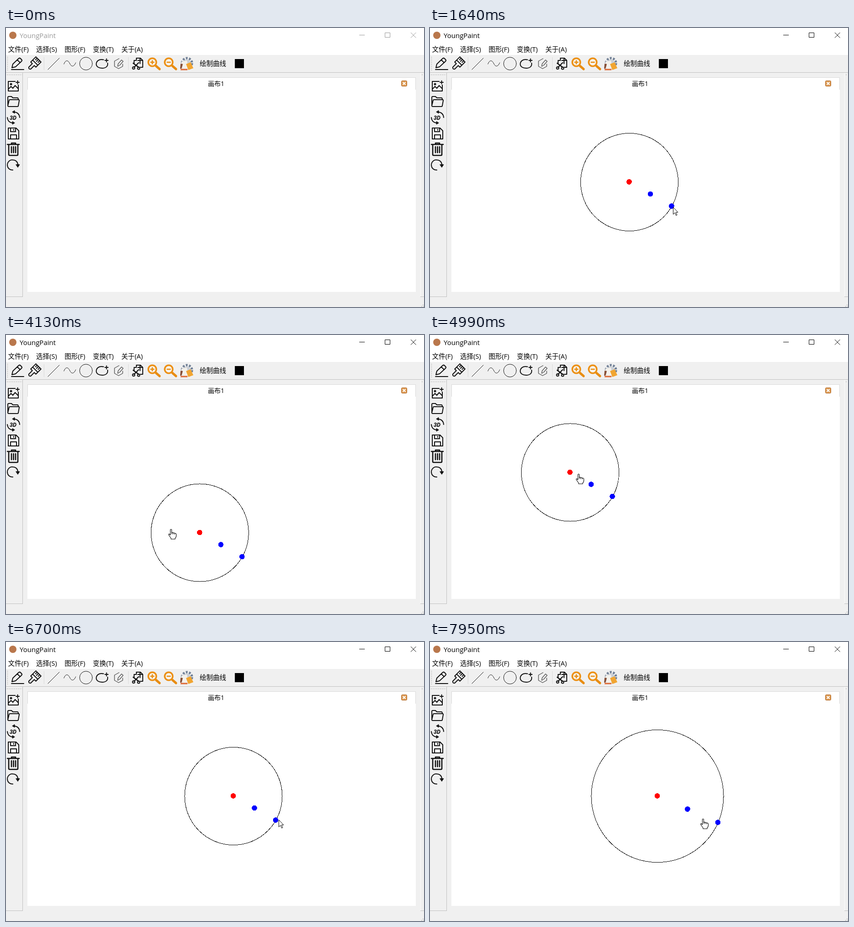
These frames come from a looping animation (917x611 px, 8000 ms). An HTML page:

```html
<!DOCTYPE html>
<html lang="zh">
<meta charset="utf-8">
<title>Paint</title>
<style>
html, body { margin: 0; width: 100%; height: 100%; overflow: hidden; background: #f0f0f0 }
svg { display: block }
text { font-family: "Open Sans", "Noto Sans CJK SC", "Noto Sans CJK", sans-serif }
.icon { fill: none; stroke: #111; stroke-width: 2; stroke-linejoin: round; stroke-linecap: round }
.thin { stroke-width: 1 }
.crisp { shape-rendering: crispEdges }
</style>
<svg width="917" height="611" viewBox="0 0 917 611">
  <path fill="#fff" d="M0 0H917V59H0ZM47 108H899V578H47Z"/>
  <g class="crisp" fill="none" stroke="#c0c0c0">
    <path d="M0 97.5H917M36.5 98V588M0 588.5H37M909 588.5H917"/>
    <path stroke="#fafafa" d="M909.5 98V588"/>
    <path stroke="#d9d9d9" d="M47.5 135V108.5H898.5V135M83.5 64V92M268.5 64V92"/>
    <path stroke="#aaa" stroke-dasharray="2" d="M3 63V95M2 102.5H35M912 102.5H915M911 609H917M914 606H917"/>
  </g>

  <circle cx="15" cy="16" r="8" fill="#b9774c"/>
  <g id="caption">
    <text x="30" y="21.5" font-size="15">YoungPaint</text>
    <path fill="none" stroke="currentColor" d="M775 15.5H787M831.5 10.5H842.5V20.5H831.5ZM888 10L899.5 21.5M899.5 10L888 21.5"/>
  </g>
  <g id="menu" font-size="14.6">
    <text x="4.5" y="52">文件(F)</text>
    <text x="66" y="52">选择(S)</text>
    <text x="128.5" y="52">图形(F)</text>
    <text x="190.5" y="52">变换(T)</text>
    <text x="253" y="52">关于(A)</text>
  </g>
  <text x="425" y="83" font-size="14.5">绘制曲线</text>
  <text x="443" y="127" font-size="14">画布1</text>
  <rect x="502" y="68" width="20" height="20"/>
  <rect x="867.5" y="115.5" width="12" height="12" rx="2" fill="#dc9850" stroke="#b06a2c"/>
  <path stroke="#fff" stroke-width="2" d="M870.5 118.5L876.5 124.5M876.5 118.5L870.5 124.5"/>

  <!-- top toolbar -->
  <g class="icon">
    <path d="M12 91H39M13 87L15 79 28 66.5Q30 65 32 67L34 69Q36 71 34 73L21 85ZM25 70L31 76"/>
    <g transform="translate(62 78) rotate(45)">
      <path d="M-8-13H8V3H3V14Q0 18-3 14V3H-8ZM-8-3H8M-4-13V-8M0-13V-7M4-13V-8"/>
    </g>
    <path class="thin" d="M92 91L117 66M127 79C131 69 136 70 140 78S149 85 153 76"/>
    <circle class="thin" cx="175.5" cy="78" r="14"/>
    <path d="M214 69.5C204 67 198 73 198 79C198 85 204 88 211 88C219 88 224 84 223 77M217 71H224M220.5 67.5V74.5"/>
    <path stroke="#555" stroke-width="1.4" d="M248 67L238 72.5V84L247 89 256 84V79M245 84L246 78.5 253.5 70 257 73 249.5 81.5Z"/>
    <path d="M281 78V71H286M286 71V66H295L300 71V86H295M294 66V71H299M289 71H294V78"/>
    <path stroke-width="2.4" d="M279 77L291 86M291 76L281 86"/>
    <circle cx="280" cy="87.5" r="2.5"/><circle cx="291" cy="88" r="2.5"/>
  </g>
  <defs>
    <g id="lens">
      <path stroke="#e88d13" stroke-width="5" stroke-linecap="round" d="M8 8L16 15"/>
      <circle r="8.8" fill="#f7f4ef" stroke="#ec9014" stroke-width="3.6"/>
      <path stroke="#e88d13" stroke-width="2.6" d="M-4.5 0H4.5"/>
    </g>
  </defs>
  <use href="#lens" x="321" y="75"/><use href="#lens" x="357" y="75"/>
  <path stroke="#e88d13" stroke-width="2.6" d="M321 70.5V79.5"/>
  <circle cx="397" cy="77" r="11" fill="none" stroke="#718096" stroke-width="5" stroke-dasharray="4 3"/>
  <circle cx="397" cy="77" r="8" fill="#c9ced5"/>
  <path fill="#f4f1eb" stroke="#ddd" d="M385 74L397 71 400 90H387Z"/>
  <path fill="#f1a531" d="M395 79L405 75 411 88 400 92Z"/>
  <path fill="#854d35" d="M383 78L388 79 385 89H382Z"/>
  <path stroke="#de6935" stroke-width="3" d="M383 91H398"/>

  <!-- side toolbar -->
  <g class="icon">
    <path d="M20 117H5V138H27V125M5 134L11 128 15 132 20 126 27 133M22 119H29M25.5 115.5V122.5"/>
    <circle cx="11" cy="123" r="1.5"/>
    <path d="M4 170V152Q4 150 6 150H12L15 153H25Q27 153 27 157M4 170L7 158Q7 157 9 157H28Q29 157 29 159L27 170Q27 172 25 172H6Q4 172 4 170"/>
    <path d="M18 184Q29 185 30 196M3 196Q4 207 15 208"/>
    <path fill="#111" stroke-width="1" d="M19 181V187L14 184ZM14 205V211L19 208Z"/>
    <path d="M5 219H22L28 225V243H5ZM10 219V227H21V219M10 243V234H23V243M17 222V224"/>
    <path stroke-width="2.6" d="M3 255H29M12 255V252H21V255M6 256V277Q6 279 8 279H24Q26 279 26 277V256M12 260V273M16.5 260V273M21 260V273"/>
    <path d="M15 311C7 311 3 306 3 300C3 293 9 288 15 289C22 289 26 294 26 300"/>
    <path fill="#111" stroke-width="1" d="M22 299H30L26 305Z"/>
  </g>
  <text x="8" y="201" font-size="12.5" font-weight="700" font-style="italic" style="font-family:Roboto,sans-serif">3D</text>

  <clipPath id="canvas"><path d="M47 135H899V578H47Z"/></clipPath>
  <g id="shape" class="crisp" clip-path="url(#canvas)">
    <circle id="ring" fill="none" stroke="#000"/>
    <circle id="hub" r="5.8" fill="#f00"/>
    <circle id="mid" r="5.8" fill="#00f"/>
    <circle id="grip" r="5.8" fill="#00f"/>
  </g>
  <path id="arrow" fill="#fff" stroke="#000" d="M.5 .5V16L4.2 12.5 6.7 18.5 9 17.5 6.5 11.7H11Z"/>
  <path id="hand" fill="#fff" stroke="#000" stroke-width="1.1" stroke-linejoin="round"
    d="M-1.5 1.5Q0-1 1.5 1.5V8Q3 6.5 4.5 8.5Q6.5 7 8 9.5Q11 8.5 11.5 11.5V15Q11 19 9 20V22H0V20L-5 13Q-6 10-3.5 11L-1.5 13ZM1.5 8V11M4.5 8.5V11.5M8 9.5V12"/>
</svg>
<script>
// Key points [time, x, y], joined by smooth curves
const center = [
  [3250, 437.5, 337.5], [3350, 435.5, 336.5], [3740, 596, 375], [4130, 425, 433],
  [4425, 233.5, 372], [4982, 307.5, 301], [5920, 499, 337.5]
];
const spoke = [
  [1080, 0, 0], [1570, 93, 53], [7010, 93, 53],
  [7710, 203, 95], [7790, 203, 95], [7927, 133, 58], [8020, 98, 47]
];
const pointer = [
  [280, 470, 582], [1080, 439, 339], [1570, 533, 392], [1800, 533, 392],
  [2100, 484, 370], [2700, 484, 367], [3120, 439, 336], [5860, 499, 340],
  [6070, 609, 390], [6200, 609, 390], [6390, 591, 388], [6590, 591, 388], [6680, 598, 389]
];
const step = 77.5, phase = 22;  // the picture advances in steps of this many ms
const lead = 90;                // the pointer runs ahead of the dragged shape

const $ = id => document.getElementById(id);
const snap = t => Math.floor((t - phase) / step) * step + phase;

// Monotone cubic: flat at extremes and rests, so the curve never overshoots
function along(path, t) {
  const i = path.findIndex(p => p[0] > t);
  if (i < 0) return path.at(-1).slice(1);
  if (!i) return path[0].slice(1);
  const slope = (j, axis) => path[j] && path[j - 1]
    ? (path[j][axis] - path[j - 1][axis]) / (path[j][0] - path[j - 1][0]) : 0;
  const tangent = (j, axis) => {
    const a = slope(j, axis), b = slope(j + 1, axis);
    return a * b > 0 ? 2 * a * b / (a + b) : 0;
  };
  const [p, q] = [path[i - 1], path[i]], span = q[0] - p[0];
  const s = (t - p[0]) / span, r = 1 - s;
  return [1, 2].map(axis =>
    r * r * ((1 + 2 * s) * p[axis] + s * span * tangent(i - 1, axis)) +
    s * s * ((1 + 2 * r) * q[axis] - r * span * tangent(i, axis)));
}

const show = (id, on) => $(id).style.display = on ? "" : "none";

function place(id, x, y) {
  $(id).setAttribute("cx", x);
  $(id).setAttribute("cy", y);
}

function draw(t) {
  const pose = snap(t);
  const [cx, cy] = along(center, pose), [dx, dy] = along(spoke, pose);
  const resizing = t >= 7010, dragging = resizing || t >= 3320 && t < 5860;

  $("caption").style.fill = $("caption").style.color = t < 1080 ? "#999" : "#000";
  $("menu").style.fill = t >= 120 && t < 1150 ? "#6d6d6d" : "#000";

  show("shape", t >= 1080);
  place("ring", cx, cy);
  $("ring").setAttribute("r", Math.hypot(dx, dy));
  ["hub", "mid", "grip"].forEach((id, i) =>
    place(id, cx - .5 + dx * i / 2, cy - .5 + dy * i / 2));

  let [x, y] = along(pointer, pose);
  if (dragging) {
    const [hx, hy] = along(center, pose + lead);
    const [ox, oy] = resizing ? along(spoke, pose + lead) : [0, 0];
    [x, y] = [hx + ox + 2, hy + oy + 2];
  }
  show("arrow", t >= 280 && !dragging);
  show("hand", dragging);
  for (const id of ["arrow", "hand"])
    $(id).setAttribute("transform", `translate(${Math.round(x)} ${Math.round(y)})`);
}

const begin = performance.now();
function tick() {
  draw((performance.now() - begin) % 8000);
  requestAnimationFrame(tick);
}
tick();
</script>
</html>
```
